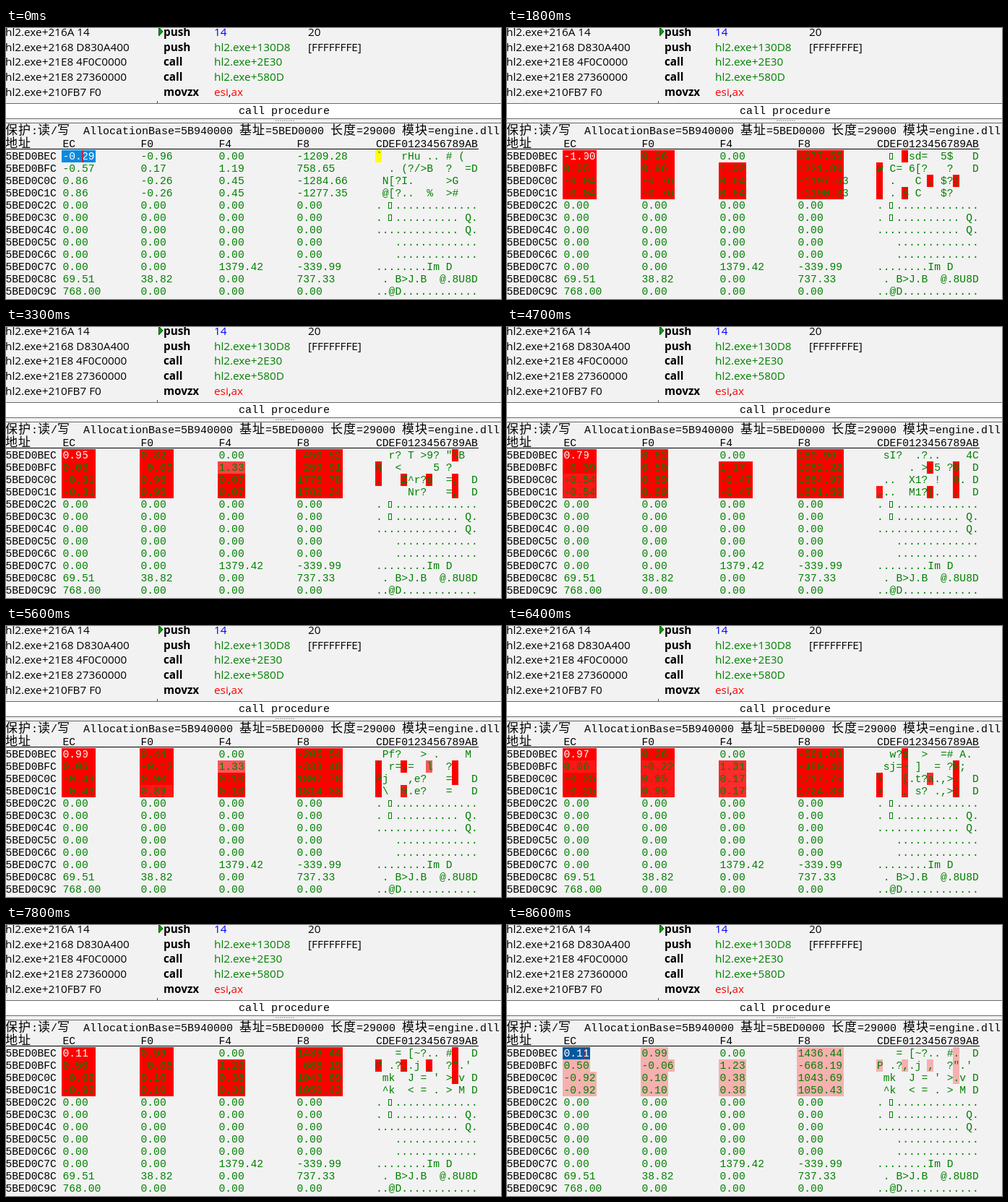
Recreate the animation shown at these times as an HTML page. Size 685 px wide and 375 px high, loop 8800 ms.

```html
<!DOCTYPE html>
<html lang="zh">
<head>
<meta charset="utf-8">
<title>Memory view</title>
<style>
html, body { margin: 0; width: 100%; height: 100%; overflow: hidden; background: #f2f2f2; }
svg { display: block; }
text { white-space: pre; }
.mono { font: 14.67px "Liberation Mono", "Courier New", monospace; }
.head { font: 15px "Liberation Mono", "Courier New", monospace; }
.cjk { font: 17px "Noto Sans CJK SC", "Noto Sans CJK", sans-serif; letter-spacing: 1px; }
.ui { font: 15.3px "Open Sans", "Noto Sans", sans-serif; }
.bold { font-weight: 700; }
</style>
</head>
<body>
<svg width="685" height="375" viewBox="0 0 685 375">
  <rect width="685" height="375" fill="#f2f2f2"/>
  <g id="still"></g>
  <g id="live"></g>
  <path id="pointer" d="M340.5 123.5v13l3-2.5 2 5 2-1-2-4.500h4.500z" fill="#fff" stroke="#000" stroke-width=".8"/>
</svg>
<script>
const LOOP = 8800, FADE = 1100, CH = 8.803, ROW = 17, TOP = 169;
const GREEN = '#008000', RED = '#ff0000', BG = [242, 242, 242];
const colX = c => 78 + 108 * c, ASCII_X = 512;
const $ = id => document.getElementById(id);
const esc = s => s.replace(/&/g, '&amp;').replace(/</g, '&lt;');
const text = (x, y, s, fill = '#000', cls = 'mono') =>
  `<text x="${x}" y="${y}" fill="${fill}" class="${cls}">${esc(s)}</text>`;
const rect = (x, y, w, h, fill) =>
  `<rect x="${x}" y="${y}" width="${w}" height="${h}" fill="${fill}"/>`;
const mix = (a, b, u) => `rgb(${a.map((v, i) => Math.round(v + (b[i] - v) * u))})`;

// view matrix poses: start time, pitch ease power, values, character pane
const poses = [
  { t: 1000, n: 1,
    m: '-0.29 -0.96 0.00 -1209.28 -0.57 0.17 1.19 758.65 0.86 -0.26 0.45 -1284.66 0.86 -0.26 0.45 -1277.35',
    a: ['`   rHu .. # (', '  . (?/>B  ?  =D', ' N[?I.     >G', ' @[?..  %  >#'] },
  { t: 1800, n: 1,
    m: '-1.00 0.06 0.00 1077.55 0.05 0.86 1.02 1221.80 -0.04 -0.76 0.64 -1197.63 -0.04 -0.76 0.64 -1190.33',
    a: ['  ▯ .sd=  5$   D', 'w C= 6[?   ?   D', '. .   C , $?)', '. . $ C   $?'] },
  { t: 3300, n: 2,
    m: '0.95 0.32 0.00 -450.52 0.03 -0.09 1.33 -259.91 -0.31 0.95 0.07 1775.78 -0.31 0.95 0.07 1782.34',
    a: ['  r? T >9? "\\B', 'N  <     5 ?', '.   Z^r?d  =,  D', '     Nr?   =,  D'] },
  { t: 4700, n: 1,
    m: '0.79 0.62 0.00 180.96 -0.39 0.50 1.17 1082.22 -0.54 0.69 -0.47 1664.97 -0.54 0.69 -0.47 1671.56',
    a: [' sI?  .?..    4C', '     . >,5 ?8  D', ' ..  X1? !  0. D', ',..  M1?|.  ,  D'] },
  { t: 6400, n: 3,
    m: '0.97 0.26 0.00 -561.08 0.06 -0.22 1.31 -480.46 -0.25 0.95 0.17 1717.75 -0.25 0.95 0.17 1724.33',
    a: ['  w?d  >  =# A.', ' sj=~ ]  = ?k;', '\\   [.t?a.,>.  D', '7   , s? .,>(  D'] },
  { t: 7800, n: 1,
    m: '0.11 0.99 0.00 1436.44 0.50 -0.06 1.23 -668.19 -0.92 0.10 0.38 1043.69 -0.92 0.10 0.38 1050.43',
    a: ['   = [~?.. #.  D', 'P .?,.j ,  ?".\'', " mk  J = ' >.v D", ' ^k  < = . > M D'] }
];
for (const p of poses) {
  p.cells = p.m.split(' ');
  const yaw = Math.atan2(p.cells[0], -p.cells[1]);
  p.yaw = yaw > 0 ? yaw - 2 * Math.PI : yaw;
  p.pitch = Math.asin(p.cells[10]);
}

// camera at a fixed spot, turned by yaw and pitch
function viewMatrix(yaw, pitch) {
  const eye = [984, -1557, 64], s = Math.sin(yaw), c = Math.cos(yaw);
  const q = Math.sin(pitch), k = Math.cos(pitch), zoom = 4 / 3, depth = 1.00025;
  const full = r => [...r, -(r[0] * eye[0] + r[1] * eye[1] + r[2] * eye[2])];
  const look = full([k * c, k * s, q]);
  const near = look.map((v, i) => depth * (i === 3 ? v - 7 : v));
  return [...full([s, -c, 0]), ...full([-q * c, -q * s, k].map(v => v * zoom)), ...near, ...look];
}

const view = new DataView(new ArrayBuffer(4));
function bytesToText(v) {
  view.setFloat32(0, v, true);
  return [0, 1, 2, 3].map(i => {
    const b = view.getUint8(i);
    return b < 32 ? '.' : b < 127 ? String.fromCharCode(b) : ' ';
  }).join('');
}

function stateAt(t) {
  const last = poses[poses.length - 1];
  if (t >= last.t) return { cells: last.cells, ascii: last.a };
  if (t <= poses[0].t) return { cells: poses[0].cells, ascii: poses[0].a };
  const i = poses.findIndex(p => p.t >= t), b = poses[i], a = poses[i - 1];
  if (b.t === t) return { cells: b.cells, ascii: b.a };
  const u = (t - a.t) / (b.t - a.t);
  const yaw = a.yaw + (b.yaw - a.yaw) * u;
  const m = viewMatrix(yaw, a.pitch + (b.pitch - a.pitch) * (1 - (1 - u) ** b.n));
  const cells = m.map(v => v.toFixed(2).replace('-0.00', '0.00'));
  m[2] = 1e-8 * Math.cos(yaw);
  const ascii = [0, 4, 8, 12].map(r => m.slice(r, r + 4).map(bytesToText).join(''));
  return { cells, ascii };
}

// screen refreshes ten times a second, missing a beat now and then
const missed = [1400, 2200, 3200, 4200, 5100, 6100, 7000, 8000];
const steps = [{ t: 0, ...stateAt(0), changed: Array(16).fill(-Infinity) }];
for (let t = 1100; t <= 8600; t += 100) {
  if (missed.includes(t)) continue;
  const prev = steps[steps.length - 1], now = stateAt(t);
  const changed = now.cells.map((v, i) => v === prev.cells[i] ? prev.changed[i] : t);
  steps.push({ t, ...now, changed });
}

const glyphs = (r, s) => {
  const y = TOP + ROW * r;
  const box = s[2] === '▯'
    ? `<rect x="${ASCII_X + 17.5}" y="${y + 4.500}" width="4" height="8" fill="none" stroke="${GREEN}"/>` : '';
  return text(ASCII_X, y + 13, s.replace('▯', ' '), GREEN) + box;
};

function drawStep(s) {
  let back = '', front = '';
  // fresh marks share the width of the widest value in their column
  const widest = [0, 1, 2, 3].map(c => Math.max(...s.cells.filter((v, i) => (i & 3) === c).map(v => v.length)));
  s.cells.forEach((v, i) => {
    const r = i >> 2, c = i & 3, y = TOP + ROW * r;
    const age = s.t - s.changed[i], lit = age < FADE;
    const chars = Math.min(7, age < FADE / 2 ? widest[c] : v.length);
    let fill = lit ? mix([255, 0, 0], BG, age / FADE) : '';
    const first = s.ascii[r][c * 4] || ' ';
    if (first !== ' ' && (lit || i === 0))
      back += rect(Math.round(ASCII_X + c * 4 * CH) - 1, y, 9, ROW, fill || '#ffff00');
    if (i === 0) fill = lit ? mix([255, 0, 0], [0, 90, 158], Math.min(1, age / 700)) : '#0a8ade';
    if (fill) back += rect(colX(c) - 1, y, Math.round(chars * CH) + 3, ROW, fill);
    front += text(colX(c) + .5, y + 13, v, i ? GREEN : '#fff');
  });
  s.ascii.forEach((a, r) => front += glyphs(r, a));
  $('live').innerHTML = back + front + rect(105.5, TOP, 1.5, ROW, RED);
}

function drawStill() {
  const code = [
    ['216A 14', 'push', '14', '20'],
    ['2168 D830A400', 'push', 'hl2.exe+130D8', '[FFFFFFFE]'],
    ['21E8 4F0C0000', 'call', 'hl2.exe+2E30', ''],
    ['21E8 27360000', 'call', 'hl2.exe+580D', ''],
    ['210FB7 F0', 'movzx', '', '']
  ];
  let out = '';
  code.forEach(([addr, op, arg, note], i) => {
    const y = 11 + 20.7 * i;
    out += text(-1, y, 'hl2.exe+' + addr, '#000', 'ui') + text(218, y, op, '#000', 'ui bold')
      + text(288, y, arg, i ? GREEN : '#0000ff', 'ui') + text(418, y, note, '#000', 'ui');
  });
  out += `<text x="288" y="93.800" class="ui" fill="${RED}">esi<tspan fill="#000">,</tspan>ax</text>`;
  out += `<path d="M211.500 -1V11L217 5z" fill="#00a000" stroke="#005000"/>`;
  out += rect(209, 101, 1, 3, '#444');
  out += rect(0, 104, 685, 22, '#696969') + rect(0, 105, 685, 20, '#fff');
  out += text(322, 119, 'call procedure', '#000', 'head');
  for (let x = 373; x < 400; x += 3) out += rect(x, 127.5, 1.5, 1.5, '#a0a0a0');
  out += rect(0, 131, 685, 1, '#696969');

  // header line: Chinese characters take two cells of the fixed pitch
  let x = -1;
  for (const part of '保护:读/写  AllocationBase=5B940000 基址=5BED0000 长度=29000 模块=engine.dll'
    .match(/[\u4e00-\u9fff]+|[^\u4e00-\u9fff]+/g)) {
    const wide = part > '\u4e00';
    out += text(x, 147, part, '#000', wide ? 'cjk' : 'head');
    x += part.length * (wide ? 18 : 9);
  }
  out += text(-1, 165, '地址', '#000', 'cjk');
  ['EC', 'F0', 'F4', 'F8'].forEach((h, c) => out += text(colX(c) + .5, 165, h));
  out += text(ASCII_X, 165, 'CDEF0123456789AB') + rect(0, 167, 654, 1, '#000');

  for (let r = 0; r < 12; r++) {
    const hex = (0xBEC + 16 * r).toString(16).toUpperCase();
    out += text(-.5, TOP + ROW * r + 13, '5BED0' + hex);
  }
  const zeros = '0.00 0.00 0.00 0.00', dots = '.'.repeat(13);
  const rows = [
    [zeros, '. ▯' + dots],
    [zeros, '. ▯.......... Q.'],
    [zeros, dots + ' Q.'],
    [zeros, '   ' + dots],
    [zeros, '   ' + dots],
    ['0.00 0.00 1379.42 -339.99', '........Im D'],
    ['69.51 38.82 0.00 737.33', ' . B>J.B  @.8U8D'],
    ['768.00 0.00 0.00 0.00', '..@D............']
  ];
  rows.forEach(([vals, ascii], i) => {
    const r = i + 4;
    vals.split(' ').forEach((v, c) => out += text(colX(c) + .5, TOP + ROW * r + 13, v, GREEN));
    out += glyphs(r, ascii);
  });
  $('still').innerHTML = out;
}

let shown = null;
function render(now) {
  const t = now % LOOP;
  const step = steps.filter(s => s.t <= t).pop();
  if (step !== shown) drawStep(shown = step);
  $('pointer').style.display = t >= 200 && t < 300 ? '' : 'none';
}

drawStill();
const begin = performance.now();
render(0);
(function tick() {
  render(performance.now() - begin);
  requestAnimationFrame(tick);
})();
</script>
</body>
</html>
```
